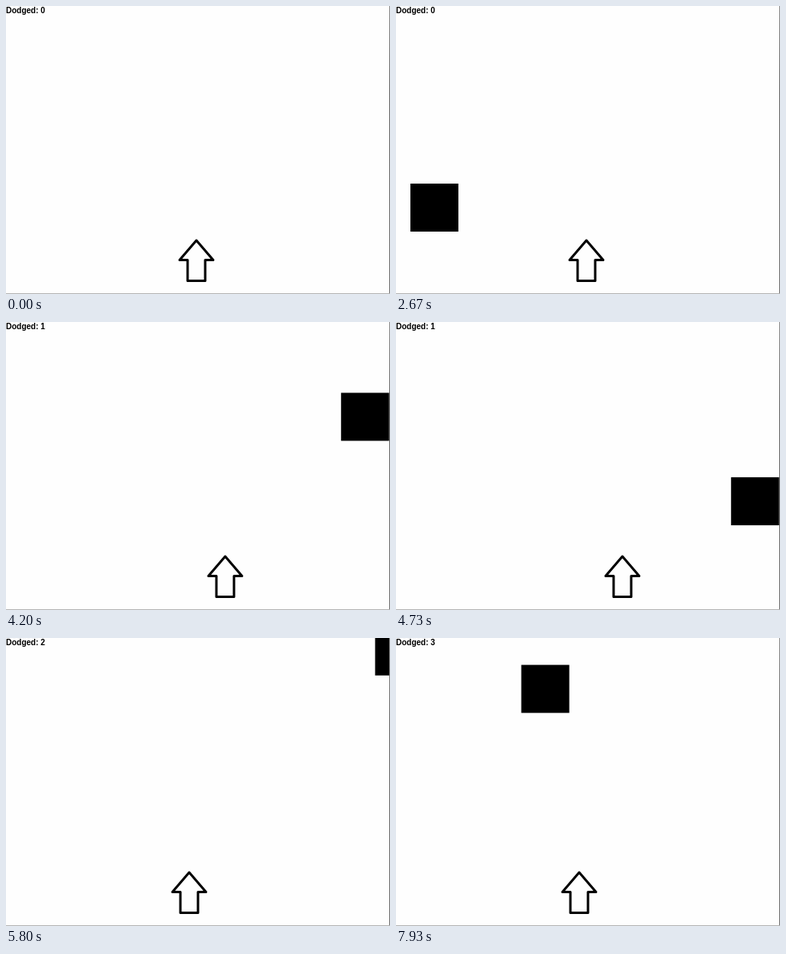
An HTML page for the animation above (8 s loop, 480 by 360 pixels).

```html
<!DOCTYPE html>
<html lang="en">
<head>
<meta charset="utf-8">
<title>Dodge the blocks</title>
<style>
  html, body { margin: 0; width: 100%; height: 100%; overflow: hidden; background: #fefefe; }
  svg { display: block; width: 480px; height: 360px; }
  text { font: bold 10px "Liberation Sans", Arial, sans-serif; white-space: pre; }
</style>
</head>
<body>
<svg viewBox="0 0 480 360">
  <defs>
    <linearGradient id="edge" x1="0" y1="0" x2="0" y2="1">
      <stop offset="0" stop-color="#8c8c8c"/>
      <stop offset=".3" stop-color="#666"/>
      <stop offset="1" stop-color="#707070"/>
    </linearGradient>
  </defs>
  <rect width="480" height="360" fill="#fefefe"/>
  <rect id="block" width="60" height="60"/>
  <path id="player" d="M0 293 L21 317.5 H11 V343.5 H-11 V317.5 H-21 Z"
        fill="#fefefe" stroke="#000" stroke-width="3" stroke-linejoin="round"/>
  <text id="score" x="0" y="9">Dodged: 0</text>
  <rect x="479" width="1" height="360" fill="url(#edge)"/>
  <rect y="359" width="480" height="1" fill="#b4b4b4"/>
</svg>
<script>
  const LOOP = 8000;
  const FRAME = 1000 / 15;
  const TICKS_PER_FRAME = 4;
  const FIRST_FRAME = 17;

  // Every block enters from just above the stage; speed is in pixels per tick.
  const blocks = [
    { start: -2, x: 18, speed: 3 },
    { start: 139, x: 418.8, speed: 3.3 },
    { start: 267, x: 461.4, speed: 3.6 },
    { start: 384, x: 156.6, speed: 3.9 }
  ];
  const moves = [
    { start: 172, ticks: 15, step: 3 },
    { start: 232, ticks: 18, step: -3 }
  ];

  const [block, player, score] =
    ['block', 'player', 'score'].map(id => document.getElementById(id));
  const clamp = (v, lo, hi) => Math.min(hi, Math.max(lo, v));

  function draw(time) {
    // Offset absorbs the rounding of frame times to 10 ms.
    const frame = Math.floor((time % LOOP + 3.4) / FRAME);
    const tick = (frame - FIRST_FRAME) * TICKS_PER_FRAME;

    const index = Math.max(0, blocks.findLastIndex(b => tick >= b.start));
    const { start, x, speed } = blocks[index];
    block.setAttribute('x', x);
    block.setAttribute('y', -60 + Math.max(0, tick - start) * speed);
    score.textContent = `Dodged: ${index}`;

    const playerX = moves.reduce(
      (sum, m) => sum + clamp(tick - m.start, 0, m.ticks) * m.step, 238);
    player.setAttribute('transform', `translate(${playerX} 0)`);
  }

  const origin = performance.now();
  function play() {
    draw(performance.now() - origin);
    requestAnimationFrame(play);
  }
  play();
</script>
</body>
</html>
```
